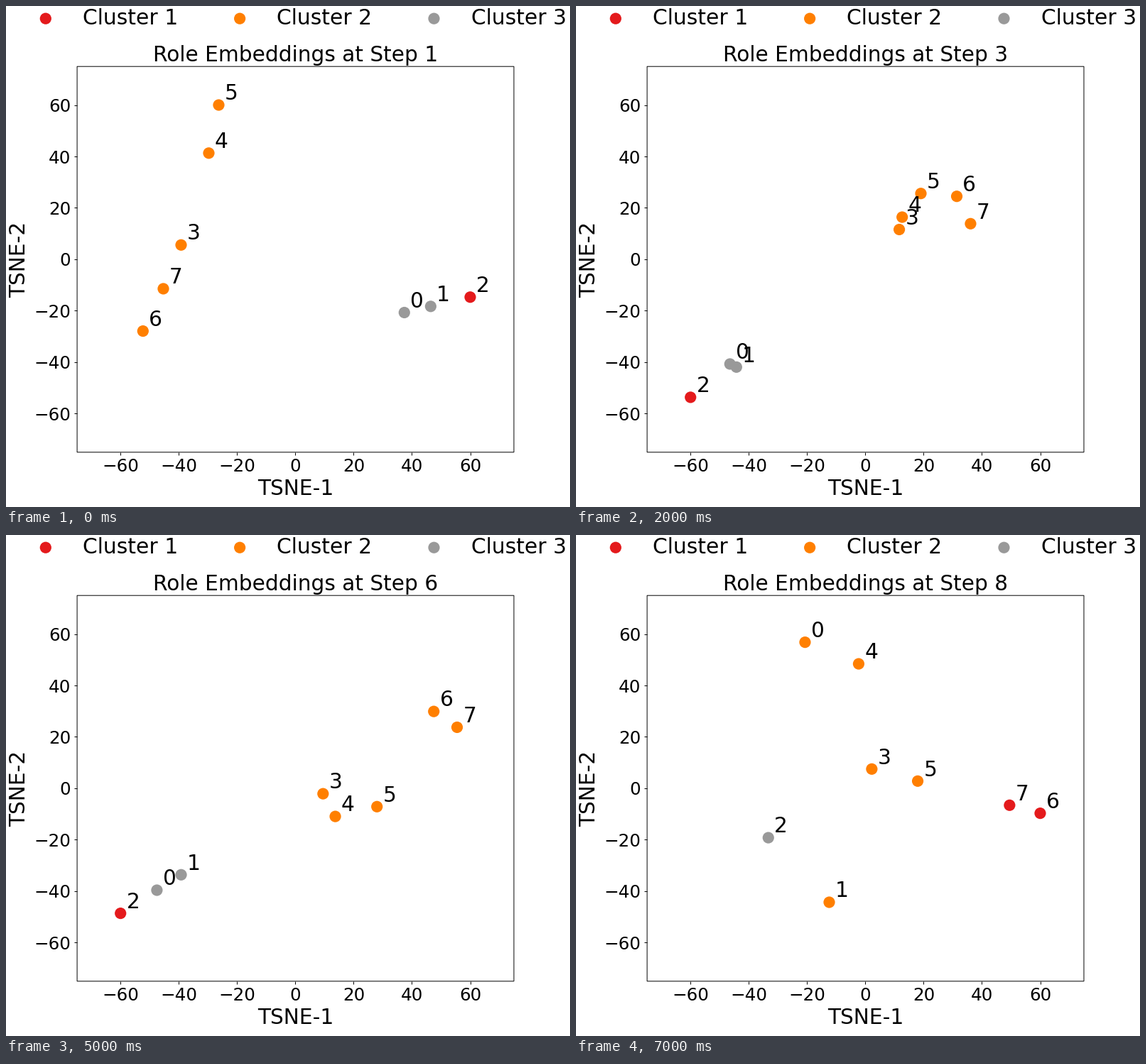
A matplotlib script for the animation above (8000 ms loop, 794 by 706 pixels).

```python
import matplotlib.pyplot as plt
import numpy as np
from matplotlib.animation import FuncAnimation
from matplotlib.patches import Rectangle

W, H, DPI = 794, 706, 100
PT = 72 / DPI          # points per pixel
K = 0.882              # scale of the default paddings and line widths
SHIFT = 0.44           # half-pixel offset of the plot area
BIG, SMALL = 29.6 * PT, 24.6 * PT
DOT = (16.2 * PT) ** 2
RED, ORANGE, GRAY = "#e41a1c", "#ff7f00", "#999999"
EARLY = [GRAY, GRAY, RED] + [ORANGE] * 5
LAST = [ORANGE, ORANGE, GRAY] + [ORANGE] * 3 + [RED, RED]


def arc(roles, *keys):
    """Spread roles on a smooth curve through keys; blanks leave gaps."""
    curve = np.polyfit(np.linspace(0, 1, len(keys)), keys, len(keys) - 1)
    span = max(len(roles) - 1, 1)
    return {int(r): np.polyval(curve, i / span)
            for i, r in enumerate(roles) if r != " "}


def layout(*arcs):
    places = {r: z for a in arcs for r, z in a.items()}
    return np.array([[places[r].real, places[r].imag] for r in range(8)])


rise = layout(arc("673 45", -52.3 - 27.9j, -36.5 + 14.3j, -26.3 + 60j),
              arc("0 1  2", 37.4 - 20.7j, 60 - 14.7j))
column = layout(arc("5 4  3 6 7", 10.1 + 60j, 16.7 - 1.6j),
                arc("012", -45.4 - 32.5j, -49.3 - 42.3j, -60 - 47.3j))
diagonal = layout(arc("67", 47.5 + 36.9j, 55.5 + 29.3j),
                  arc("345", 9.5 - 2.6j, 13.7 - 13.5j, 28 - 8.8j),
                  arc("1 0  2", -39.2 - 41.5j, -60 - 60j))
fall = layout(arc("67 34", -40.9 + 60j, -7.3 + 27.5j),
              arc("5", -38.6 + 29.4j),
              arc("102", 39.5 - 3.2j, 41.1 - 10.3j, 60 - 18.2j))
row = layout(arc("6 7  5   3 4      1 0  2",
                 -51.8 - 15.7j, 4.1 - 9.2j, 60 - 4.7j))
mixed = layout(arc("04", -20.7 + 56.8j, -2.3 + 48.4j),
               arc("3  5     7 6", 2.2 + 7.5j, 60 - 9.7j),
               arc("21", -33.3 - 19.2j, -12.4 - 44.3j))

STEPS = [rise, column, (column + diagonal) / 2, diagonal,
         fall, diagonal * (1, 0.81), row, mixed]

plt.rcParams["font.family"] = "DejaVu Sans"
fig = plt.figure(figsize=(W / DPI, H / DPI), dpi=DPI, facecolor="white")

ax = fig.add_axes([0.125 + SHIFT / W, 0.11 - SHIFT / H, 0.775, 0.77])
ax.set(xlim=(-75, 75), ylim=(-75, 75))
ticks = range(-60, 61, 20)
ax.set_xticks(ticks)
ax.set_yticks(ticks)
ax.tick_params(labelsize=SMALL, length=3.5 * K, pad=3.5 * K, width=0.8 * K)
ax.spines[:].set_visible(False)
ax.set_xlabel("TSNE-1", fontsize=BIG, labelpad=4 * K)
ax.set_ylabel("TSNE-2", fontsize=BIG, labelpad=4 * K + 1)
title = ax.set_title("", fontsize=BIG, pad=6 * K)

dots = ax.scatter(*rise.T, s=DOT, c=EARLY, linewidths=0, zorder=3)
labels = [ax.text(0, 0, str(i), fontsize=BIG, zorder=4) for i in range(8)]

# Frame and legend row, laid out in stage pixels
top = fig.add_axes([0, 0, 1, 1])
top.set(xlim=(0, W), ylim=(H, 0))
top.axis("off")
top.add_patch(Rectangle((100.1, 85.2), 614.9, 543.6, fill=False,
                        lw=0.8 * K, ec="black", snap=False))
for i, color in enumerate([RED, ORANGE, GRAY]):
    x = 273.35 * i
    top.add_patch(plt.Circle((55.8 + x, 17.7), 8.1, fc=color, lw=0))
    top.text(108.1 + x, 26, f"Cluster {i + 1}", fontsize=29.8 * PT)


def draw(n):
    points = STEPS[n]
    title.set_text(f"Role Embeddings at Step {n + 1}")
    dots.set_offsets(points)
    dots.set_facecolor(LAST if n == len(STEPS) - 1 else EARLY)
    for label, point in zip(labels, points):
        label.set_position(point + 2)
    return [title, dots, *labels]


anim = FuncAnimation(fig, draw, frames=len(STEPS), interval=1000,
                     repeat=True, repeat_delay=0, blit=False)
plt.show()
```
